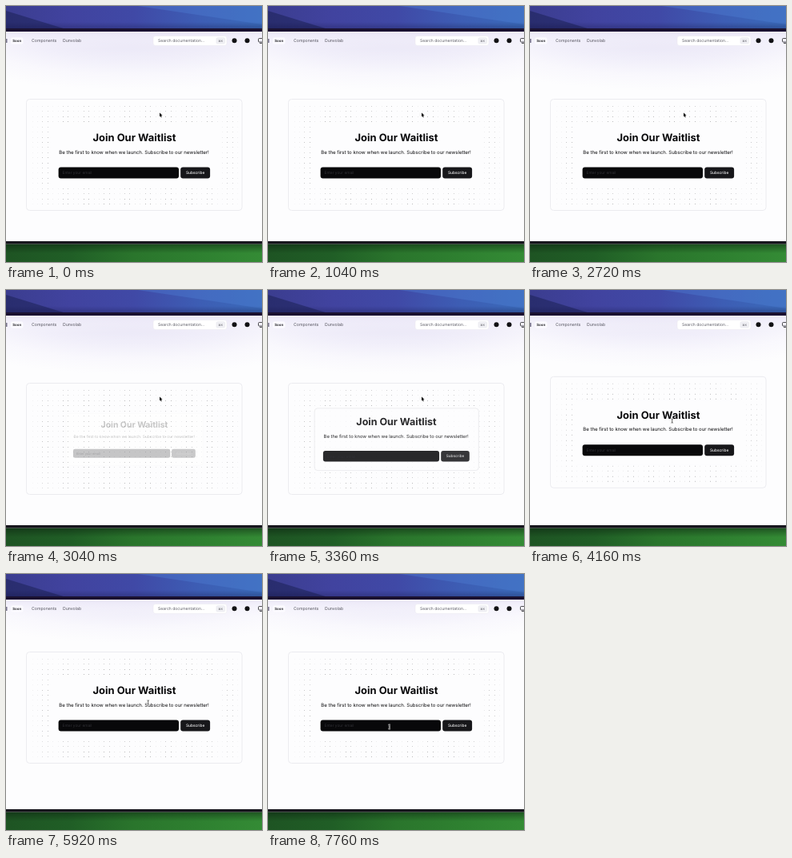
An HTML page with a canvas for the animation above (8000 ms loop, 320 by 320 pixels).

```html
<!DOCTYPE html>
<html lang="en">
<head>
<meta charset="utf-8">
<title>Waitlist</title>
<style>
  html, body { margin: 0; width: 100%; height: 100%; overflow: hidden; background: #fdfdfe; }
  canvas { display: block; width: 100vw; height: 100vh; }
</style>
</head>
<body>
<canvas id="stage"></canvas>
<script>
const SIZE = 320, LOOP = 8000, STEP = 80;
const FONT = 'Inter, "Liberation Sans", sans-serif';
const canvas = document.getElementById('stage');
const ctx = canvas.getContext('2d');
const ratio = Math.max(1, window.devicePixelRatio || 1);
canvas.width = canvas.height = SIZE * ratio;
ctx.textRendering = 'geometricPrecision';

const clamp = v => Math.min(1, Math.max(0, v));
const progress = (t, from, length) => clamp((t - from) / length);
const easeOut = (x, power) => 1 - (1 - x) ** power;
const smooth = x => x * x * (3 - 2 * x);

function box(x, y, w, h, r, fill, stroke) {
  ctx.beginPath();
  ctx.roundRect(x, y, w, h, r);
  if (fill) { ctx.fillStyle = fill; ctx.fill(); }
  if (stroke) { ctx.strokeStyle = stroke; ctx.stroke(); }
}

function disc(x, y, r, color) {
  ctx.beginPath();
  ctx.arc(x, y, r, 0, Math.PI * 2);
  ctx.fillStyle = color;
  ctx.fill();
}

function polygon(points, fill) {
  ctx.beginPath();
  points.forEach(([x, y]) => ctx.lineTo(x, y));
  ctx.closePath();
  ctx.fillStyle = fill;
  ctx.fill();
}

function text(str, x, y, size, color, { weight = 400, align = 'left' } = {}) {
  ctx.font = `${weight} ${size}px ${FONT}`;
  ctx.textAlign = align;
  ctx.fillStyle = color;
  ctx.fillText(str, x, y);
}

function addStops(g, colors) {
  colors.forEach((c, i) => g.addColorStop(i / (colors.length - 1), c));
  return g;
}

// Evenly spaced color stops along a line.
const gradient = (x0, y0, x1, y1, ...colors) =>
  addStops(ctx.createLinearGradient(x0, y0, x1, y1), colors);

function rect(x, y, w, h, fill) {
  ctx.fillStyle = fill;
  ctx.fillRect(x, y, w, h);
}

function drawDesktop() {
  rect(0, 0, SIZE, 29, gradient(0, 0, SIZE, 0, '#3b3d8f', '#41439f', '#4049a6', '#3d5db4', '#3a6bba'));
  polygon([[0, 6], [75, 29], [0, 29]], 'rgba(25,30,80,.5)');
  polygon([[165, 0], [320, 0], [320, 23]], 'rgba(80,130,215,.35)');
  rect(0, 20, SIZE, 9, gradient(0, 20, 0, 29, 'rgba(15,15,60,0)', 'rgba(15,15,60,.3)'));
  rect(0, 28, SIZE, 4, '#1a1130');
  rect(0, 297, SIZE, 23, gradient(0, 0, SIZE, 0, '#1e5423', '#205e26', '#2a752c', '#2e8030', '#348b35'));
  rect(0, 297, SIZE, 12, gradient(0, 297, 0, 309, 'rgba(8,28,12,.5)', 'rgba(8,28,12,0)'));
  rect(0, 293.5, SIZE, 3.5, '#17161d');
  rect(0, 297, SIZE, 1, '#46524a');
}

function drawGlow(scroll) {
  ctx.save();
  ctx.translate(160, 30 - scroll);
  ctx.scale(1, 0.26);
  const glow = addStops(ctx.createRadialGradient(0, 0, 0, 0, 0, 290),
    ['#e8e4f6', '#ebe8f7', '#f1effa', '#f9f8fd', '#fdfdfe']);
  disc(0, 0, 290, glow);
  ctx.restore();
}

function drawHeader() {
  rect(0, 32, SIZE, 22, gradient(0, 32, 0, 54, 'rgba(234,230,247,.75)', 'rgba(244,242,251,.4)', 'rgba(248,247,252,0)'));
  rect(0, 41, 1.5, 5, '#77728c');
  box(6, 39.3, 15.5, 8.4, 2.5, '#fbfaff');
  text('Soon', 13.7, 45, 4.4, '#111114', { weight: 600, align: 'center' });
  text('Components', 32, 45.2, 5.2, '#55545e');
  text('Dunvolab', 71, 45.2, 5.2, '#55545e');

  ctx.lineWidth = 0.5;
  box(184, 37.5, 92, 12, 3, '#fff', '#e8e6ef');
  text('Search documentation...', 190, 45.2, 5.05, '#5d5d66');
  box(263, 39.7, 10.5, 7.4, 1.5, '#f1f1f5', '#e2e2e8');
  text('⌘K', 268.2, 44.8, 3.5, '#62626b', { align: 'center' });
  disc(285.5, 43.3, 3, '#111114');
  disc(301.5, 43.3, 3, '#111114');
  ctx.lineWidth = 0.8;
  box(315.5, 40.5, 7, 4.5, 1, null, '#222226');
  rect(317, 46, 4, 0.8, '#222226');
}

function drawDots() {
  const gap = 6.42;
  for (let i = 0; i <= 40; i++) {
    for (let j = 0; j < 20; j++) {
      const x = 32.5 + i * gap, y = 125 + j * gap;
      const distance = Math.hypot((x - 160) / 150, (y - 186) / 115);
      const fade = clamp((1.15 - distance) * 2.2);
      const alpha = (i & 2 ? 0.3 : 0.1) * (j & 2 ? 1 : 0.7) * fade;
      rect(Math.round(x), Math.round(y), 1, 1, `rgba(30,30,35,${alpha})`);
    }
  }
}

function drawForm(shown) {
  const scale = 0.75 + 0.25 * shown;
  ctx.save();
  ctx.globalAlpha = shown;
  ctx.translate(160.5, 186.5);
  ctx.scale(scale, scale);
  ctx.translate(-160.5, -186.5);

  const edge = 0.12 * clamp((1 - shown) * 8);
  ctx.lineWidth = 0.7;
  box(54.5, 146.5, 212.5, 80.5, 4, '#fdfdfe', `rgba(30,30,45,${edge})`);

  text('Join Our Waitlist', 160.5, 168.8, 12.95, '#08080a', { weight: 700, align: 'center' });
  text('Be the first to know when we launch. Subscribe to our newsletter!',
    160.1, 184.7, 6.06, '#08080a', { align: 'center' });

  box(65.6, 201.6, 150.4, 13.8, 3, '#08080a');
  text('Enter your email', 70.5, 210.4, 4.85, '#313136');
  box(218.2, 201.6, 36.9, 13.8, 3, '#17171a');
  text('Subscribe', 236.6, 210.3, 4.85, '#f6f6f7', { weight: 500, align: 'center' });
  ctx.restore();
}

function drawArrow(x, y) {
  ctx.save();
  ctx.translate(x, y);
  ctx.lineWidth = 0.8;
  ctx.strokeStyle = '#fff';
  polygon([[0, 0], [0, 4.8], [1.1, 3.9], [1.9, 5.7], [2.7, 5.3], [1.9, 3.6], [3.4, 3.5]], '#050505');
  ctx.stroke();
  ctx.fill();
  ctx.restore();
}

function drawBeam(x, y) {
  ctx.beginPath();
  for (const side of [-1, 1]) {
    ctx.moveTo(x - 1.2, y + side * 2.7);
    ctx.lineTo(x, y + side * 2.2);
    ctx.lineTo(x + 1.2, y + side * 2.7);
  }
  ctx.moveTo(x, y - 2.2);
  ctx.lineTo(x, y + 2.2);
  for (const [width, color] of [[1.7, '#fff'], [0.7, '#222']]) {
    ctx.lineWidth = width;
    ctx.strokeStyle = color;
    ctx.stroke();
  }
}

// Each move: start, duration, dx, dy.
const moves = [
  [3520, 240, -14.3, 30],
  [4500, 220, 0, -3],
  [6160, 240, -9, 23],
  [6880, 240, -17, 7.5]
];

function drawCursor(t) {
  let x = 192, y = 133.5;
  for (const [start, length, dx, dy] of moves) {
    const k = smooth(progress(t, start, length));
    x += dx * k;
    y += dy * k;
  }
  if (t < 3680) drawArrow(x, y);
  else drawBeam(x, y);
}

function draw(t) {
  const scroll = 19 * easeOut(progress(t, 4020, 420), 1.4);
  const shown = t < 2960 ? 1 : easeOut(progress(t, 2960, 600), 1.8);
  ctx.setTransform(canvas.width / SIZE, 0, 0, canvas.height / SIZE, 0, 0);
  drawDesktop();

  ctx.save();
  ctx.beginPath();
  ctx.rect(0, 32, SIZE, 262);
  ctx.clip();
  rect(0, 32, SIZE, 262, '#fdfdfe');
  drawGlow(scroll);
  ctx.translate(0, -scroll);
  ctx.lineWidth = 0.8;
  box(25.5, 116.5, 269.5, 139, 4, '#fdfdfe', '#e8e8ec');
  drawDots();
  drawForm(shown);
  ctx.restore();

  drawHeader();
  drawCursor(t);
}

const began = performance.now();
function tick() {
  const t = (performance.now() - began) % LOOP;
  draw(Math.floor(t / STEP) * STEP);
  requestAnimationFrame(tick);
}
tick();
</script>
</body>
</html>
```
